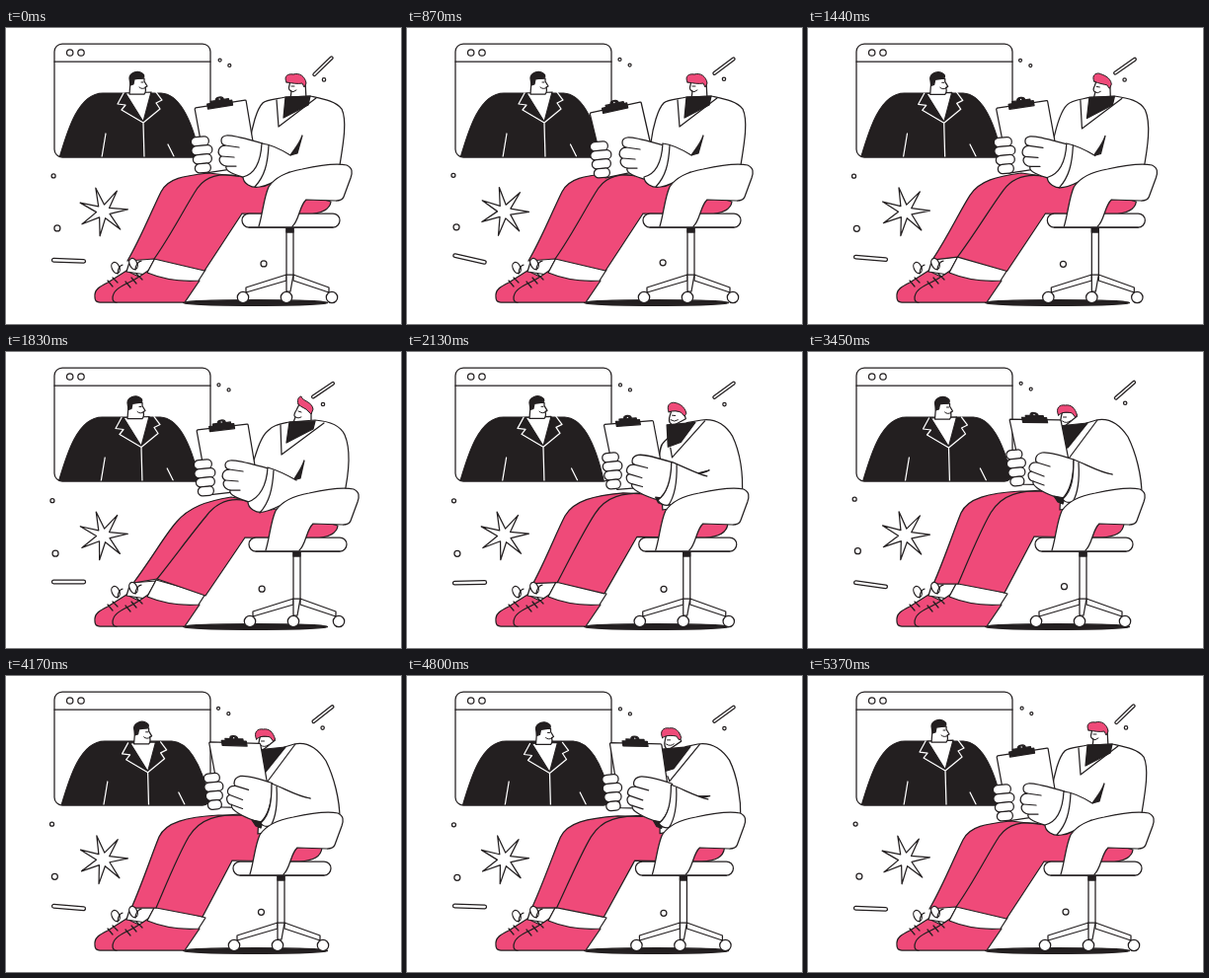
Animation, 400 px wide and 300 px high, one loop 5400 ms. Source, as an HTML page with a canvas:

```html
<!DOCTYPE html>
<html lang="en">
<head>
<meta charset="utf-8">
<title>Video interview</title>
<style>
html, body { margin: 0; width: 100%; height: 100%; overflow: hidden; background: #fff; }
canvas { display: block; width: 400px; height: 300px; }
</style>
</head>
<body>
<canvas id="stage" width="400" height="300"></canvas>
<script>
const ctx = document.getElementById('stage').getContext('2d');
const LOOP = 5400, INK = '#231f20', PINK = '#ef4a79', WHITE = '#fff';
const STOPS = [0, 870, 1830, 2610, 3450, 4800, LOOP];

const smooth = x => { x = Math.min(1, Math.max(0, x)); return x * x * (3 - 2 * x); };
const ramp = (t, a, b) => smooth((t - a) / (b - a));

// Eased value through one entry per stop; the last returns to the first.
function track(t, ...v) {
  let i = 0;
  while (i < 5 && t >= STOPS[i + 1]) i++;
  const next = i === 5 ? v[0] : v[i + 1];
  return v[i] + (next - v[i]) * ramp(t, STOPS[i], STOPS[i + 1]);
}

let back = 0, fwd = 0;
const blend = (a, b, c) => a + (b - a) * back + (c - a) * fwd;

// Blends three outlines with equal commands: upright, leaning back, leaning forward.
function mix(a, b, c) {
  const nb = b.match(/[\d.]+/g), nc = c.match(/[\d.]+/g);
  let i = 0;
  return a.replace(/[\d.]+/g, n => { const v = blend(+n, +nb[i], +nc[i]); i++; return v.toFixed(2); });
}

function draw(path, fill, stroke = INK, width = 1.25) {
  const p = typeof path === 'string' ? new Path2D(path) : path;
  if (fill) { ctx.fillStyle = fill; ctx.fill(p); }
  if (stroke) { ctx.strokeStyle = stroke; ctx.lineWidth = width; ctx.stroke(p); }
}

function pill(x, y, w, h, r, fill = WHITE) {
  const p = new Path2D();
  p.roundRect(x, y, w, h, r);
  draw(p, fill);
}

function oval(x, y, rx, ry = rx, fill = WHITE) {
  const p = new Path2D();
  p.ellipse(x, y, rx, ry, 0, 0, 7);
  draw(p, fill);
}

function at(x, y, deg, fn) {
  ctx.save();
  ctx.translate(x, y);
  ctx.rotate(deg * Math.PI / 180);
  fn();
  ctx.restore();
}

function floaters(t) {
  const a = t / LOOP * 4 * Math.PI, c = Math.cos(a), s = Math.sin(a);
  const dot = (x, y, r, k) => oval(x + c * k, y - s * k, r);
  dot(47.3, 150, 2, .8);
  dot(50.6, 203, 3, 1.3);
  dot(259.7, 239, 3, 1.3);
  dot(215.8, 32.6, 1.5, .8);
  dot(225.8, 38, 1.5, .5);
  dot(321.3, 52.4, 1.7, .7);
  at(63.5, track(t, 235.8, 234, 233, 235.5, 235.8, 233.5), track(t, 2, 13, 0, -4, 8, 2),
    () => pill(-17, -1.8, 34, 3.6, 1.8));
  at(321, 38.7, track(t, -44, -37, -34, -41, -41, -36), () => pill(-13.5, -1.4, 27, 2.8, 1.4));
  at(98.5, 186, track(t, 0, 6, 1, 0, 3, 2), () => {
    const p = new Path2D();
    for (let i = 0; i < 14; i++) {
      const r = i % 2 ? 7 : 25, b = (i * 180 / 7 - 5) * Math.PI / 180;
      p.lineTo(r * Math.cos(b), r * Math.sin(b));
    }
    p.closePath();
    draw(p, WHITE);
  });
}

function videoCall(t) {
  const dx = track(t, 0, 0, -2, 1, 3.5, 5.5), dy = track(t, 0, 0, .5, 0, 1, 2.5);
  const wide = track(t, 0, 1.5, 0, 9, 9, 9), frame = new Path2D();
  frame.roundRect(49, 16, 158, 115, 8);
  draw(frame, WHITE, null);
  ctx.save();
  ctx.clip(frame);
  ctx.translate(dx * .4, 0);
  const r = x => x + wide;
  draw(`M54 132C62 105 73 66 98 66L${r(157)} 66C${r(177)} 67 ${r(189)} 96 ${r(197)} 132Z`, INK);
  draw(`M101 107L97 131M${r(164)} 118L${r(170)} 130`, null, WHITE);
  ctx.translate(dx * .6, dy);
  draw('M121 66L147 65L139 95Z', WHITE);
  draw('M119 66L113 77L121 78L117 83L139 96L156 82L152 76L158 73L152 65M139 96L140 132', null, WHITE);
  draw('M125 67L126 54L130 51L140 51L140 54L143 59L141 60C142 64 141 66 140 67Z', WHITE);
  draw('M126 58L125 51C125 46 133 42 138 46C141 48 140 51 137 51L130 52L129 57Z', INK);
  draw('M135 60Q138 63 142 60M137 55L139 55', null, INK, 1);
  ctx.restore();
  draw(frame);
  draw('M49 34L207 34');
  oval(64.7, 25, 3.2);
  oval(76, 25, 3.2);
}

function legs() {
  draw('M90 273C89 265 95 262 103 258L122 246L143 256L112 278L95 278C91 278 90 276 90 273Z', PINK);
  draw('M126 234L152 232L142 250L122 247Z', WHITE);
  draw('M108 274C108 267 114 263 122 259C132 255 138 250 144 246L196 256L181 278L112 278C109 278 108 276 108 274Z', PINK);
  draw('M152 231L202 245L195 256C180 257 160 255 143 248Z', WHITE);
  draw(mix(
    'M123 236C136 214 148 184 157 166C164 152 180 150 205 147L250 152L329 176C328 184 320 188 305 189L239 188L201 246L150 234Z',
    'M129 234C149 207 160 187 172 173C185 157 204 151 228 147L255 152L336 176C335 184 327 188 312 189L242 188L202 247L153 230Z',
    'M127 235C138 210 148 180 155 163C162 148 183 143 215 141L250 141L320 174C319 183 312 187 297 188L229 187L199 244L152 235Z'), PINK);
  draw(mix(
    'M150 234C169 207 182 180 194 162C203 150 215 147 236 150',
    'M153 230C172 206 188 184 203 166C213 153 227 147 244 151',
    'M152 235C164 207 174 182 185 163C196 145 211 139 256 140'));
  // Laces
  at(111, 243, -25, () => oval(0, 0, 3.8, 5.8));
  at(129, 239, -25, () => oval(0, 0, 3.8, 5.8));
  draw('M113 249C113 244 116 240 118 240M131 245C131 241 134 236 137 236');
  draw('M103 256L108 262M108 253L113 258M121 257L126 263M127 253L132 259M132 249L138 255');
}

function chairStand() {
  draw('M284 250L243 263L243 268L284 256ZM291 250L327 263L327 268L291 256Z', WHITE);
  draw('M284 202L291 202L291 250L288 267L284 267Z', WHITE);
  draw('M284 250L291 250M284 203L291 203L291 207L284 207Z', INK);
  for (const x of [240, 284, 330]) oval(x, 273, 5.7);
}

function chairSeat() {
  pill(239, 188, 99, 14, 7);
  draw('M256 201C260 188 261 172 266 161C274 149 288 145 300 143C318 139 335 137 345 139C351 142 351 146 349 152L342 171C341 174 338 175 334 175L304 174C297 180 297 195 290 201', WHITE);
  draw('M246 202L331 202');
}

function head(shift) {
  at(shift, 0, 0, () => {
    draw(mix(
      'M288 72L289 64C286 63 286 61 287 58L288 53L303 54L304 72Z',
      'M290 74L293 66C291 65 292 62 294 59L297 53L309 60L309 74Z',
      'M255 78L257 76C253 74 254 69 255 65L256 61L268 61C271 65 273 70 277 76Z'), WHITE);
    draw(mix(
      'M284 55C281 49 285 46 291 47C297 45 303 49 304 56L302 60L300 56C296 57 290 56 284 55Z',
      'M296 53C294 48 297 45 299 45C300 50 310 50 311 58L309 63L306 60C304 57 300 57 296 53Z',
      'M252 64C249 57 253 53 259 54C265 53 269 57 271 64L269 66L266 62C262 61 257 60 252 64Z'), PINK, INK, 1);
    draw(mix(
      'M289 59L292 59M288 64Q291 66 294 63',
      'M296 60L299 61M293 66Q296 68 299 66',
      'M257 66L260 66M256 70Q260 73 264 70'), null, INK, 1);
  });
}

function torso() {
  draw(mix(
    'M247 116C249 100 254 82 260 76C264 72 275 72 283 70L308 69C322 72 334 74 340 82C346 95 341 120 337 145L262 158Z',
    'M249 116C254 100 258 86 265 80C270 74 278 73 287 71L313 69C326 70 338 73 343 84C349 98 348 120 342 147L268 160Z',
    'M258 104C257 100 256 98 258 96C264 90 275 80 282 72L292 69C306 66 316 74 324 86C332 102 338 125 338 145L255 160Z'), WHITE);
  draw(mix(
    'M283 70L308 69L306 78L281 91Z',
    'M287 71L313 70L311 78L284 92Z',
    'M253 75L283 72L263 97L256 98Z'), INK);
  draw(mix(
    'M274 73L276 100L314 71',
    'M278 74L279 104L322 72',
    'M262 107L264 108L293 69'));
  draw(mix(
    'M300 109C297 118 291 124 288 129L295 127Z',
    'M302 110C299 119 294 125 291 130L298 128Z',
    'M308 124C303 124 298 123 290 120L292 121Z'), INK);
}

function clipboard(tilt, turn, lift) {
  const x = blend(191, 193, 202) - 6 * tilt + 2 * turn + 3 * lift;
  const y = blend(81, 79, 71) + 5 * tilt - 3 * turn - 2 * lift;
  const ux = blend(52, 52, 49) + 3 * turn;
  const uy = blend(-8, -6, -3) - 3 * tilt + 4 * turn + lift;
  const vx = blend(11, 11, 13) + 4 * tilt - 3 * lift;
  ctx.save();
  ctx.transform(ux / 52, uy / 52, vx / 66, 1, x, y);
  draw('M1 0L51 0Q52 0 52 1L52 66L1 66L0 1Z', WHITE);
  draw('M13 -2L17 -2L17 -4L22 -4C22 -8 30 -8 30 -4L35 -4L35 -2L38 -2L38 3L13 3Z', INK);
  oval(26, -5, 1.3);
  ctx.restore();
}

function hands(tilt, lift) {
  at(blend(0, 3, 13.5) - 2 * tilt - lift, blend(0, -1, -11) + 5 * tilt - lift, 0, () => {
    [[187, 18], [187.5, 21], [189, 19], [191, 16]].forEach(([x, w], i) =>
      at(x, 111 + i * 9, -5, () => pill(0, 0, w - 2 * fwd, 9.3, 4.6)));
  });
  at(lift, 2 * tilt - lift, 0, () => {
    draw(mix(
      'M260 117C245 113 230 108 223 109C216 110 217 118 222 119C215 119 213 127 218 130C214 133 217 139 223 140C221 145 232 149 243 152C254 147 260 135 260 117Z',
      'M266 118C250 114 234 109 227 110C220 111 221 118 226 119C219 119 217 127 222 130C218 133 221 139 227 140C225 145 236 149 249 153C260 148 266 135 266 118Z',
      'M269 109C254 104 244 101 237 102C229 104 230 111 232 112C224 111 222 119 226 121C221 123 223 130 228 131C226 136 240 144 257 149C267 140 269 125 269 109Z'), WHITE);
    draw(mix(
      'M222 119L236 121M218 130L231 131M223 140L233 140',
      'M226 119L240 121M222 130L235 131M227 140L237 140',
      'M232 112L245 116M226 121L239 126M228 131L239 135'));
  });
}

function sleeve() {
  draw(mix(
    'M252 150L260 150L256 156L252 154Z',
    'M258 150L266 150L262 156L258 154Z',
    'M249 146L260 148L258 154L253 152Z'), INK);
  draw(mix(
    'M288 129C280 124 268 118 259 117C258 135 252 148 240 151C240 157 248 163 257 161C268 160 277 152 287 146',
    'M294 130C287 126 275 120 265 117C264 135 257 148 245 152C245 158 253 164 261 162C272 160 282 153 292 148',
    'M308 124C295 122 282 114 269 109C269 125 268 140 258 149C260 152 264 153 268 152C275 152 285 150 296 146'), WHITE);
  draw(mix(
    'M266 119C265 138 262 150 252 161',
    'M271 120C270 138 267 152 257 163',
    'M274 112C275 128 274 142 268 152'));
}

function render(t) {
  const forward = ramp(t, 1850, 2290);
  back = ramp(t, 1170, 1730) - forward;
  fwd = forward - ramp(t, 4650, 5250);
  const tilt = ramp(t, 250, 850) - ramp(t, 1000, 1650);
  const home = 1 - ramp(t, 4800, 5300);
  const turn = ramp(t, 2650, 3400) * home, lift = ramp(t, 3600, 4700) * home;
  const chairX = blend(0, 7, -9);

  ctx.fillStyle = WHITE;
  ctx.fillRect(0, 0, 400, 300);
  videoCall(t);
  floaters(t);
  oval(252.5, 278.5, 73, 2.8, INK);
  at(chairX, 0, 0, chairStand);
  legs();
  head(turn * 1.5);
  torso();
  clipboard(tilt, turn, lift);
  hands(tilt, lift);
  sleeve();
  at(chairX, 0, 0, chairSeat);
}

ctx.lineJoin = ctx.lineCap = 'round';
const start = performance.now();
function tick() {
  render((performance.now() - start) % LOOP);
  requestAnimationFrame(tick);
}
tick();
</script>
</body>
</html>
```
